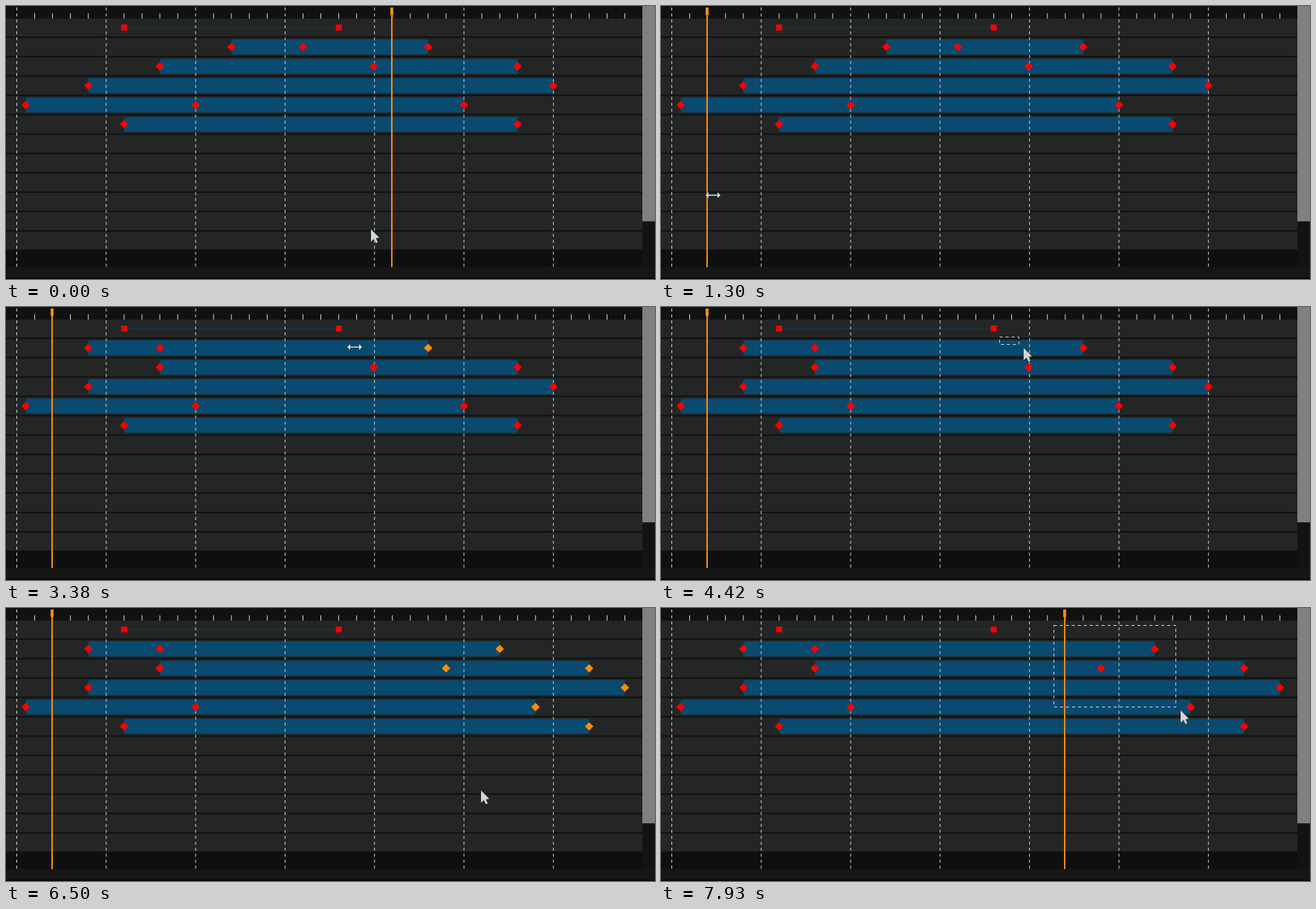
These frames come from a looping animation (873 px wide and 368 px high, 8000 ms). An HTML page with a canvas:

```html
<!DOCTYPE html>
<html lang="en">
<head>
<meta charset="utf-8">
<title>Timeline editor</title>
<style>
html, body { margin: 0; width: 873px; height: 368px; overflow: hidden; background: #101111; }
canvas { display: block; }
</style>
</head>
<body>
<canvas id="stage" width="873" height="368"></canvas>
<script>
const ctx = document.getElementById('stage').getContext('2d');
const LOOP = 8000, STEP = 130;
const TICK = 24.06, LEFT = 14.5, RIGHT = 856, BOTTOM = 352;
const HEAD_MID = 2, ROW_TOP = 17, PITCH = 26.1, ROW_H = 24.1, BAR_H = 20.1;
const RED = '#ff0000', ORANGE = '#ff8c00', GRID = '#d5d5d5';
const DASH = [4.015, 4.015];

// Keyframe positions in ticks, one list per bar
const BARS = [[12, 16, 23], [8, 19.95, 28], [4, 30], [0.5, 10, 25], [6, 28]];

// Pointer path: step, x, y, shape
const PATH = [
  [0, 491, 301, 'arrow'], [3, 519, 297, 'resize'], [4, 519, 297, 'resize'],
  [10, 70, 255, 'resize'], [11, 105, 240, 'arrow'], [14, 565, 51, 'hand'],
  [15, 565, 51, 'hand'], [18, 755, 51, 'hand'], [19, 755, 51, 'hand'],
  [21, 661, 54, 'resize'], [25, 469, 54, 'resize'], [27, 469, 54, 'arrow'],
  [32, 456, 41, 'arrow'], [33, 456, 41, 'arrow'], [38, 762, 178, 'arrow'],
  [40, 633, 125, 'arrow'], [41, 616, 133, 'hand'], [42, 616, 133, 'hand'],
  [46, 713, 133, 'hand'], [47, 690, 170, 'arrow'], [48, 648, 238, 'arrow'],
  [49, 648, 238, 'arrow'], [50, 639, 246, 'arrow'], [55, 545, 10, 'arrow'],
  [57, 545, 10, 'arrow'], [58, 529, 24, 'arrow'], [59, 529, 24, 'arrow'],
  [61, 699, 138, 'arrow']
];

const tickX = k => LEFT + k * TICK;
const rowY = i => ROW_TOP + i * PITCH + ROW_H / 2;
const clamp = (v, lo, hi) => Math.min(hi, Math.max(lo, v));

function pointer(n) {
  let i = PATH.length - 1;
  while (i > 0 && PATH[i][0] > n) i--;
  const a = PATH[i], b = PATH[i + 1] || a;
  const u = b === a ? 0 : (n - a[0]) / (b[0] - a[0]);
  const e = u * u * (3 - 2 * u);
  return { x: a[1] + (b[1] - a[1]) * e, y: a[2] + (b[2] - a[2]) * e, shape: a[3] };
}

// Whole ticks dragged between two steps, up to step n
function dragged(n, from, to) {
  const end = clamp(n, from, to);
  return Math.round((pointer(end).x - pointer(from).x) / TICK);
}

function playhead(n) {
  if (n >= 55) return 22;
  return Math.round((pointer(clamp(n, 4, 10)).x - LEFT) / TICK);
}

// A keyframe snaps to a whole tick once it has been dragged
function keyTick(row, i, n) {
  const last = i === BARS[row].length - 1;
  let d = 0;
  if (row === 0) {
    if (last) d += dragged(n, 15, 18);
    d += dragged(n, 21, 25);
  }
  if (last || (row === 1 && i === 1)) d += dragged(n, 42, 46);
  const k = BARS[row][i];
  return d ? Math.round(k + d) : k;
}

function isSelected(row, i, n) {
  const last = i === BARS[row].length - 1;
  if (n >= 15 && n < 34) return row === 0 && last;
  return n >= 39 && n < 60 && (last || (row === 1 && i === 1));
}

function rect(x, y, w, h, color) {
  ctx.fillStyle = color;
  ctx.fillRect(x, y, w, h);
}

function polygon(points, fill, stroke) {
  ctx.beginPath();
  points.forEach(([x, y]) => ctx.lineTo(x, y));
  ctx.closePath();
  ctx.fillStyle = fill;
  if (stroke) {
    ctx.strokeStyle = stroke;
    ctx.lineWidth = 1;
    ctx.stroke();
  }
  ctx.fill();
}

function diamond(x, y, color) {
  const r = 5.7;
  polygon([[x, y - r], [x + r, y], [x, y + r], [x - r, y]], color);
}

function drawBackground() {
  rect(0, 0, 873, 368, '#101111');
  for (let i = 0; i < 12; i++) rect(0, ROW_TOP + i * PITCH, RIGHT, ROW_H, '#242626');
  rect(0, 329, RIGHT, BOTTOM - 329, '#0e0f0f');
  rect(RIGHT, 0, 17, 290.5, '#808080');
  rect(RIGHT, 290.5, 17, 61.5, '#121313');
  rect(0, BOTTOM, 873, 14, '#161617');
  rect(0, 366, 873, 2, '#0d0609');
}

function drawBars(n) {
  rect(tickX(6), 28.6, 12 * TICK, 1, '#0b3c5a');
  BARS.forEach((bar, row) => {
    const x = tickX(keyTick(row, 0, n));
    const end = tickX(keyTick(row, bar.length - 1, n));
    ctx.fillStyle = '#094a70';
    ctx.beginPath();
    ctx.roundRect(x, rowY(row + 1) - BAR_H / 2, end - x, BAR_H, 2);
    ctx.fill();
  });
}

function drawGrid() {
  ctx.strokeStyle = GRID;
  ctx.lineWidth = 1;
  for (let k = 0; k < 35; k++) {
    const x = tickX(k);
    const major = k % 5 === 0;
    ctx.setLineDash(major ? DASH : []);
    ctx.beginPath();
    ctx.moveTo(x, major ? HEAD_MID : 9.8);
    ctx.lineTo(x, major ? BOTTOM : ROW_TOP);
    ctx.stroke();
  }
  ctx.setLineDash([]);
}

function drawKeys(n) {
  for (const k of [6, 18]) rect(tickX(k) - 4, rowY(0) - 4, 8, 8, RED);
  BARS.forEach((bar, row) => bar.forEach((_, i) => {
    diamond(tickX(keyTick(row, i, n)), rowY(row + 1), isSelected(row, i, n) ? ORANGE : RED);
  }));
}

function drawSelection(n) {
  const start = n >= 34 && n < 39 ? 33 : n >= 60 ? 59 : null;
  if (start === null) return;
  const a = pointer(start), b = pointer(n);
  ctx.strokeStyle = GRID;
  ctx.lineWidth = 1;
  ctx.setLineDash(DASH);
  ctx.strokeRect(Math.round(a.x) - 0.5, Math.round(a.y) - 0.5,
    Math.round(b.x - a.x - 6), Math.round(b.y - a.y - 4));
  ctx.setLineDash([]);
}

function drawPlayhead(n) {
  const x = Math.floor(tickX(playhead(n)));
  rect(x - 1, HEAD_MID, 2, BOTTOM - HEAD_MID, '#f48a15');
  rect(x - 2, HEAD_MID, 4, 10, '#f48a15');
}

const SHAPES = {
  arrow() {
    polygon([[0, 0], [0, 16.5], [3.8, 13], [6.6, 18.5], [9, 17.3], [6.4, 12], [11, 11.3]],
      '#d2d6d6', '#2b2e2e');
  },
  resize() {
    polygon([[-10, 0], [-6, -4], [-6, -0.8], [6, -0.8], [6, -4], [10, 0],
      [6, 4], [6, 0.8], [-6, 0.8], [-6, 4]], '#d5dada', '#25292b');
  },
  hand() {
    ctx.beginPath();
    ctx.moveTo(-2, 1);
    ctx.quadraticCurveTo(0, -2, 2, 1);
    ctx.lineTo(2.8, 7);
    ctx.lineTo(9, 8);
    ctx.quadraticCurveTo(11, 9, 10.6, 13);
    ctx.lineTo(8.5, 22);
    ctx.lineTo(-0.5, 22.5);
    ctx.lineTo(-7, 14);
    ctx.quadraticCurveTo(-6.5, 10.5, -3, 13.5);
    ctx.lineTo(-1, 14.5);
    ctx.closePath();
    ctx.strokeStyle = '#303435';
    ctx.lineWidth = 1;
    ctx.stroke();
    ctx.fillStyle = '#d8dada';
    ctx.fill();
  }
};

function drawPointer(n) {
  const p = pointer(n);
  ctx.save();
  ctx.translate(p.x, p.y);
  SHAPES[p.shape]();
  ctx.restore();
}

function draw(n) {
  drawBackground();
  drawBars(n);
  drawGrid();
  drawKeys(n);
  drawSelection(n);
  drawPlayhead(n);
  drawPointer(n);
}

function frame() {
  draw(Math.floor((performance.now() % LOOP) / STEP));
  requestAnimationFrame(frame);
}
frame();
</script>
</body>
</html>
```
